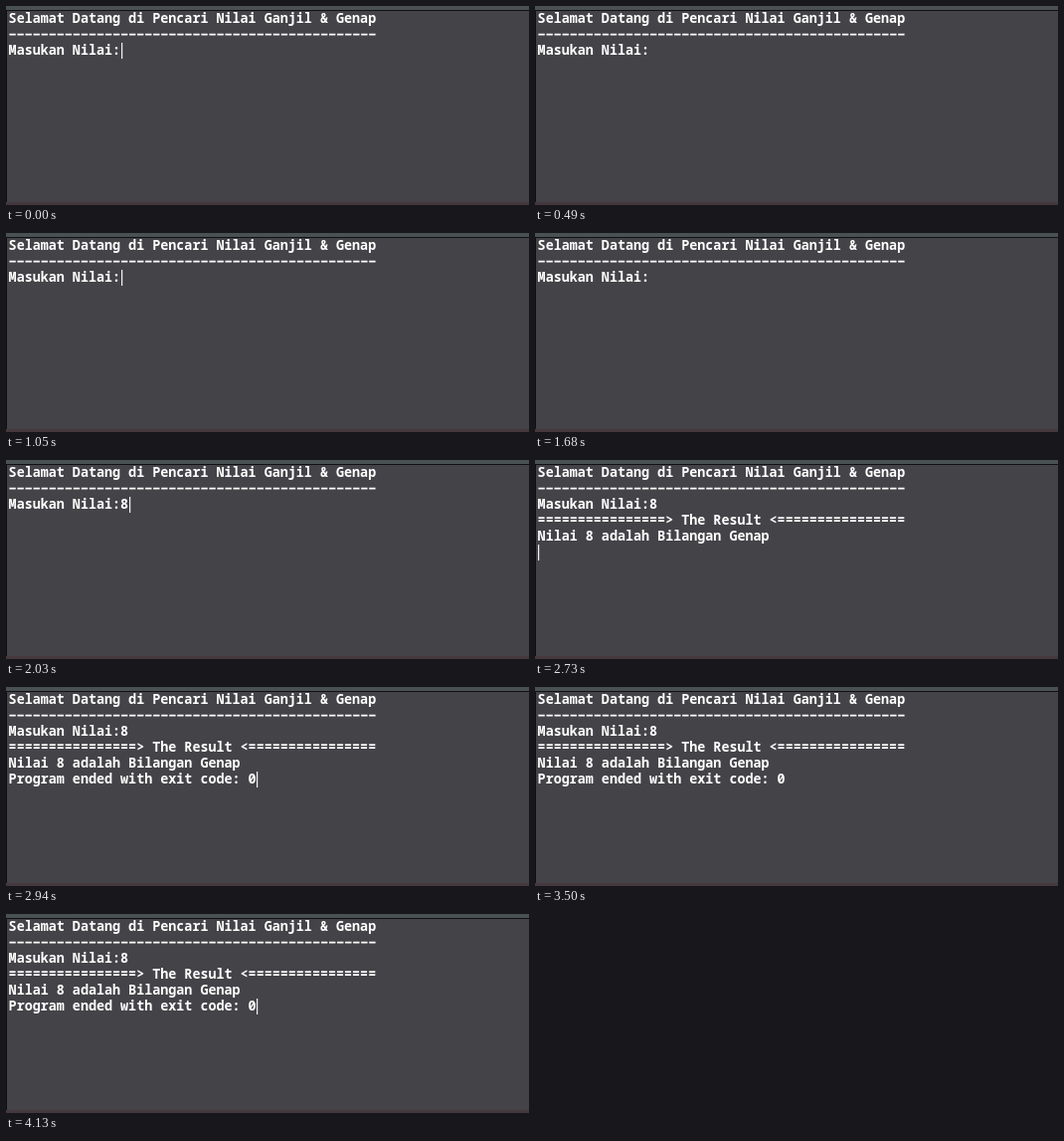
Recreate the animation shown at these times as an HTML page. Size 526x200 px, loop 4.41 s.

```html
<!DOCTYPE html>
<html lang="id">
<head>
<meta charset="utf-8">
<title>Console</title>
<style>
  html, body { margin: 0; width: 100%; height: 100%; overflow: hidden; background: #444347; }
  svg { display: block; width: 526px; height: 200px; }
  text { font: 700 13.4px "Noto Sans Mono", "DejaVu Sans Mono", monospace; fill: #fff; white-space: pre; }
</style>
</head>
<body>
<svg viewBox="0 0 526 200">
  <rect width="526" height="200" fill="#444347"/>
  <rect width="526" height="4" fill="#4a5153"/>
  <rect y="4" width="526" height="1" fill="#111113"/>
  <rect y="4" width="1" height="196" fill="#111113"/>
  <rect y="197" width="526" height="3" fill="#46393e"/>
  <path id="rule" stroke="#fff" stroke-width="1.7"/>
  <g id="lines"></g>
  <rect id="caret" width="1.2" height="16" fill="#f2f2f2"/>
</svg>
<script>
const LOOP = 4410, LEFT = 2.6, PITCH = 8.04, LEADING = 16;
const bars = '='.repeat(16);

// [row, appears at, text]
const output = [
  [0, 0, 'Selamat Datang di Pencari Nilai Ganjil & Genap'],
  [2, 0, 'Masukan Nilai:'],
  [2, 2030, 'Masukan Nilai:8'],
  [3, 2730, bars + '> The Result <' + bars],
  [4, 2730, 'Nilai 8 adalah Bilangan Genap'],
  [5, 2940, 'Program ended with exit code: 0']
];

// [from, column, row]; a negative column hides the caret
const caretSteps = [
  [0, 14, 2], [490, -1, 2], [1050, 14, 2], [1680, -1, 2],
  [2030, 15, 2], [2590, -1, 2], [2660, 0, 3], [2730, 0, 5],
  [2940, 31, 5], [3500, -1, 5], [4130, 31, 5]
];

const byId = id => document.getElementById(id);
const caret = byId('caret');

const rows = Array.from({ length: 6 }, (_, row) => {
  const node = document.createElementNS('http://www.w3.org/2000/svg', 'text');
  node.setAttribute('x', LEFT);
  node.setAttribute('y', 17.3 + row * LEADING);
  return byId('lines').appendChild(node);
});

let dashes = '';
for (let i = 0; i < 46; i++) dashes += `M${LEFT + 0.8 + i * PITCH} 28.6h6.4`;
byId('rule').setAttribute('d', dashes);

function draw(t) {
  const shown = rows.map(() => '');
  for (const [row, at, text] of output) if (t >= at) shown[row] = text;
  rows.forEach((node, i) => {
    if (node.textContent !== shown[i]) node.textContent = shown[i];
  });

  const [, column, row] = caretSteps.filter(step => t >= step[0]).pop();
  caret.setAttribute('visibility', column < 0 ? 'hidden' : 'visible');
  caret.setAttribute('x', Math.round(LEFT + 0.4 + Math.max(column, 0) * PITCH));
  caret.setAttribute('y', 5 + row * LEADING);
}

const start = performance.now();
function tick() {
  draw((performance.now() - start) % LOOP);
  requestAnimationFrame(tick);
}
draw(0);
requestAnimationFrame(tick);
</script>
</body>
</html>
```
